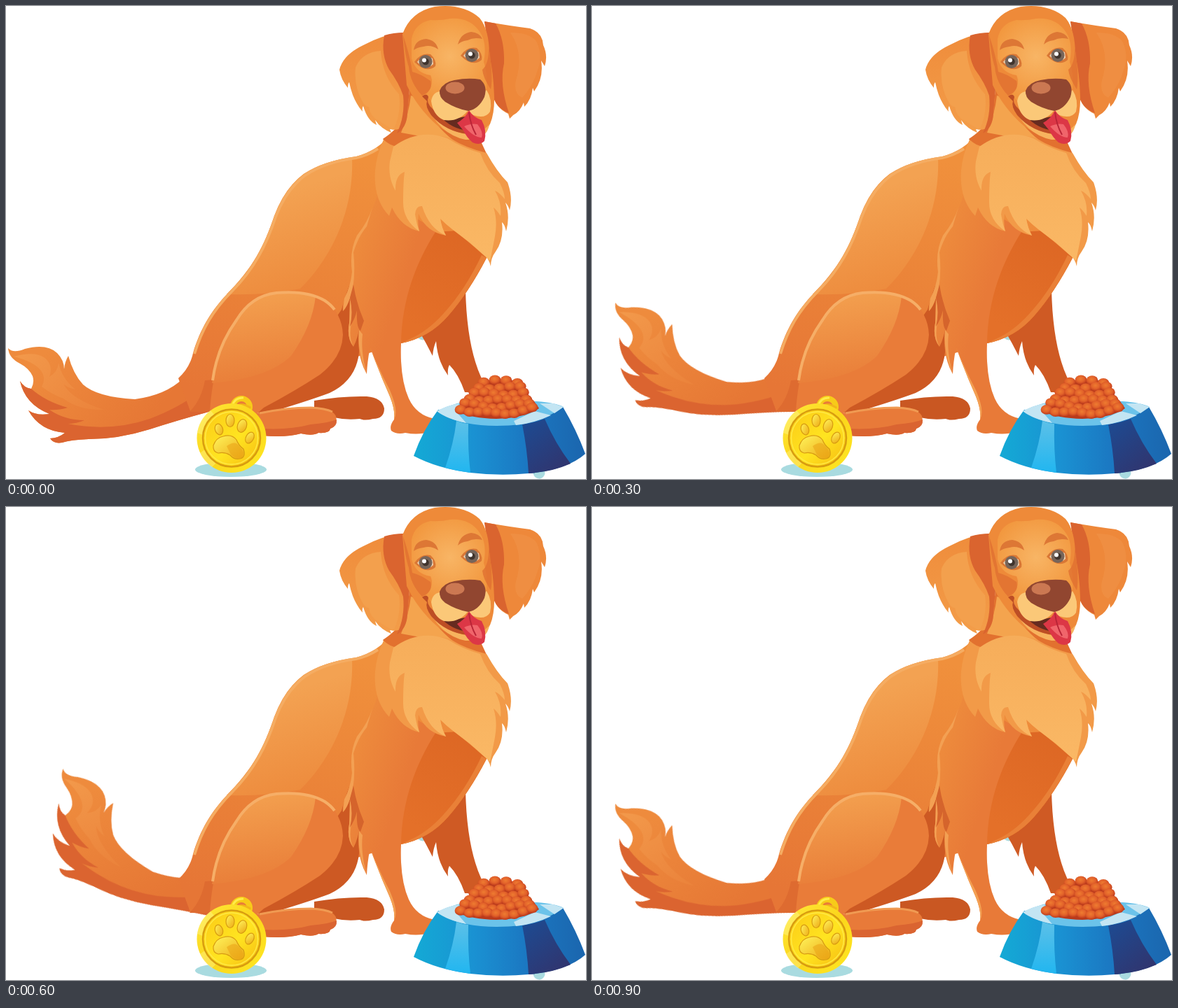
An HTML page for the animation above (1200 ms loop, 828 px wide and 676 px high).

```html
<!DOCTYPE html>
<html lang="en">
<head>
<meta charset="utf-8">
<title>Dog wagging its tail</title>
<style>
  html, body { margin: 0; width: 100%; height: 100%; overflow: hidden; background: #fff; }
  svg { display: block; width: 100vw; height: 100vh; }
  .tail { transform-origin: 293px 585px; animation: wag 1.2s step-end infinite; }
  @keyframes wag {
    0%, 100% { transform: none; }
    25%, 75% { transform: rotate(13.5deg); }
    50% { transform: translate(3.3px, 6.3px) rotate(27deg); }
  }
</style>
</head>
<body>
<svg viewBox="0 0 828 676">
  <defs>
    <linearGradient id="tailFill" gradientUnits="userSpaceOnUse" x1="60" y1="490" x2="200" y2="600">
      <stop stop-color="#ee8b3d"/><stop offset="1" stop-color="#e67735"/>
    </linearGradient>
    <linearGradient id="tuft" gradientUnits="userSpaceOnUse" x1="30" y1="490" x2="150" y2="590">
      <stop stop-color="#f2984a"/><stop offset="1" stop-color="#ea8039"/>
    </linearGradient>
    <linearGradient id="body" gradientUnits="userSpaceOnUse" x1="500" y1="220" x2="400" y2="580">
      <stop stop-color="#f0903c"/><stop offset=".6" stop-color="#ea8138"/><stop offset="1" stop-color="#e67636"/>
    </linearGradient>
    <linearGradient id="back" gradientUnits="userSpaceOnUse" x1="395" y1="265" x2="440" y2="410">
      <stop stop-color="#f3a252"/><stop offset="1" stop-color="#ed8a3c"/>
    </linearGradient>
    <linearGradient id="thigh" gradientUnits="userSpaceOnUse" x1="350" y1="410" x2="370" y2="535">
      <stop stop-color="#f3a04f"/><stop offset="1" stop-color="#e97e39"/>
    </linearGradient>
    <linearGradient id="leg" gradientUnits="userSpaceOnUse" x1="500" y1="300" x2="590" y2="330">
      <stop stop-color="#ee8d3d"/><stop offset="1" stop-color="#e87a38"/>
    </linearGradient>
    <linearGradient id="belly" gradientUnits="userSpaceOnUse" x1="590" y1="460" x2="670" y2="330">
      <stop stop-color="#e47029"/><stop offset="1" stop-color="#dd6724"/>
    </linearGradient>
    <linearGradient id="ruff" x1="0" y1="0" x2="0" y2="1">
      <stop stop-color="#f6ad5a"/><stop offset="1" stop-color="#fab865"/>
    </linearGradient>
    <linearGradient id="ear" x1="0" y1="0" x2="0" y2="1">
      <stop stop-color="#ef8c3b"/><stop offset="1" stop-color="#f39d49"/>
    </linearGradient>
    <radialGradient id="face" gradientUnits="userSpaceOnUse" cx="634" cy="72" r="62">
      <stop stop-color="#f8b565"/><stop offset="1" stop-color="#f2983f"/>
    </radialGradient>
    <linearGradient id="bowl" gradientUnits="userSpaceOnUse" x1="585" y1="0" x2="825" y2="0">
      <stop stop-color="#14a9d5"/><stop offset=".35" stop-color="#1a91d2"/><stop offset=".65" stop-color="#1b78c2"/><stop offset="1" stop-color="#1b66ae"/>
    </linearGradient>
    <linearGradient id="facet" x1="0" y1="0" x2="0" y2="1">
      <stop stop-color="#5cc0e8"/><stop offset="1" stop-color="#21b6f0"/>
    </linearGradient>
    <linearGradient id="shade" x1="0" y1="0" x2=".7" y2="1">
      <stop stop-color="#1c4c94"/><stop offset="1" stop-color="#30356f"/>
    </linearGradient>
    <linearGradient id="gold" x1="0" y1="0" x2="1" y2="1">
      <stop stop-color="#ffea3a"/><stop offset=".5" stop-color="#fbd51b"/><stop offset="1" stop-color="#ffe923"/>
    </linearGradient>
    <linearGradient id="disc" x1="0" y1="0" x2="1" y2="1">
      <stop stop-color="#fbc915"/><stop offset=".55" stop-color="#ffe421"/><stop offset="1" stop-color="#f6b90f"/>
    </linearGradient>
    <linearGradient id="pad" x1="0" y1="0" x2="1" y2="1">
      <stop stop-color="#fff45c"/><stop offset="1" stop-color="#eda813"/>
    </linearGradient>
    <radialGradient id="bit" cx=".45" cy=".4" r=".6">
      <stop stop-color="#ee7c31"/><stop offset=".55" stop-color="#e2622a"/><stop offset="1" stop-color="#bd391c"/>
    </radialGradient>
  </defs>

  <g fill="#a9dbe0">
    <ellipse cx="321" cy="662.5" rx="51" ry="10.5"/>
    <circle cx="761" cy="667" r="8.5"/>
    <circle cx="595" cy="469" r="8.5"/>
  </g>

  <!-- far legs -->
  <path fill="#cf5a24" d="M590 465Q600 482 609 500Q610 488 614 479Q616 508 631 528Q630 518 633 513Q646 526 655 552L690 552Q658 505 656 405L620 430Z"/>
  <path fill="#c95722" d="M440 564Q480 557 515 558Q537 560 540 575Q540 590 524 590Q512 593 505 590Q485 592 468 588L440 590Z"/>

  <g class="tail">
    <path fill="url(#tailFill)" d="M3 489Q10 497 27 490Q58 482 73 496Q83 506 83 519Q84 508 89 500Q96 526 110 541Q130 559 184 562Q228 556 252 533L285 520L293 579Q245 592 205 605Q160 619 118 619Q92 620 80 624Q68 626 63 618Q76 617 84 610Q48 607 32 578Q44 586 62 583Q27 569 20 536Q26 546 36 547Q41 538 38 529Q33 518 20 511Q4 503 3 489Z"/>
    <path fill="#db6430" d="M20 536Q26 546 36 547Q56 565 88 574Q74 578 62 577Q84 592 112 592Q101 597 88 597Q150 609 205 590Q250 573 284 546L293 579Q245 592 205 605Q160 619 118 619Q92 620 80 624Q68 626 63 618Q76 617 84 610Q48 607 32 578Q44 586 62 583Q27 569 20 536Z"/>
    <path fill="url(#tuft)" d="M11 501Q40 493 54 502Q68 512 62 530Q74 523 75 510Q80 533 99 548Q88 546 82 540Q93 562 140 577Q104 578 82 561Q67 556 51 544Q58 531 49 520Q39 508 11 501Z"/>
  </g>

  <!-- torso -->
  <path fill="url(#body)" d="M549 183Q532 206 500 215Q454 221 425 240Q398 260 383 300C369 342 352 375 321 406C292 435 277 463 267 496C264 510 257 522 246 532L263 579L293 580L505 500L564 482Q604 474 631 443Q660 410 686 360L680 215Z"/>
  <path fill="url(#back)" d="M494 217Q454 221 425 240Q398 260 383 300C369 342 352 375 315 412Q370 414 420 404C465 360 497 292 494 217Z"/>
  <path fill="none" stroke="#f5ac62" stroke-width="4" d="M531 204Q517 213 500 217Q455 223 427 242Q400 262 385 301C371 343 354 376 323 407C294 436 279 464 269 497"/>
  <path fill="#de6b30" d="M284 535L298 534L293 580L262 580Q279 563 284 535Z"/>
  <path fill="#cd5923" d="M479 434Q484 415 490 400L510 440L504 495Q500 535 462 553Q430 565 366 584L340 570L440 490Z"/>

  <!-- near hind leg -->
  <path fill="#e97c39" d="M291 580C294 534 304 489 327 449Q348 414 385 410Q430 405 455 420Q480 439 481 470Q480 502 448 527Q413 550 368 574L350 590Z"/>
  <path fill="url(#thigh)" d="M294 539C297 510 309 478 327 449Q348 414 385 410Q418 407 442 414Q438 456 407 500Q375 532 294 539Z"/>
  <path fill="none" stroke="#f6ae67" stroke-width="4" d="M295 535C299 505 311 474 329 449Q350 414 386 410Q430 406 455 421Q464 427 469 434"/>
  <path fill="#e87a39" d="M352 583Q389 574 435 573Q465 574 471 586Q474 599 463 604Q462 611 446 610Q438 615 421 611Q400 617 366 614Z"/>
  <path fill="#da6431" d="M366 604Q405 606 435 598Q460 596 472 591Q473 601 463 604Q462 611 446 610Q438 615 421 611Q400 617 366 614Z"/>
  <path fill="none" stroke="#f09a52" stroke-width="3" d="M362 582Q400 574 435 574Q456 575 466 580"/>

  <!-- foreleg and belly -->
  <path fill="url(#leg)" d="M530 270Q520 305 501 328Q490 350 494 380Q492 401 483 418Q480 426 481 436Q487 430 491 417Q495 440 490 453Q486 474 496 487Q501 478 504 463Q500 500 515 526Q516 505 520 488Q532 522 548 558Q556 578 554 591Q547 600 550 607Q558 613 570 610Q590 614 605 608L612 590Q586 585 575 561Q562 532 564 482L622 325Z"/>
  <path fill="#f3a053" d="M523 288Q517 308 501 328Q490 350 494 380Q492 401 483 418L481 436Q487 430 491 417L495 404Q499 380 496 352Q503 329 515 315ZM491 417Q496 440 493 453Q489 474 496 487Q486 474 490 453ZM504 463Q501 494 515 526Q506 493 509 469ZM520 488Q532 522 548 558Q556 578 554 591Q561 579 548 549Q532 519 520 488Z"/>
  <path fill="#d5642c" d="M496 398L491 417Q496 438 491 458Q498 448 501 435Q500 460 506 464L511 450Q500 425 496 398Z"/>
  <path fill="url(#belly)" d="M613 323C585 367 565 420 564 482Q604 474 631 443Q660 410 686 360L660 320Z"/>
  <path fill="#e98037" d="M564 482Q604 474 631 443Q660 410 686 360L679 356Q656 405 625 439Q601 466 574 477Z"/>

  <!-- neck and ruff -->
  <path fill="#e2712f" d="M576 120L572 150Q565 172 538 190L560 225L670 225L686 211L674 185L640 120Z"/>
  <path fill="#f4a44e" d="M578 128Q575 155 564 181L602 188L640 193Q612 172 590 132Z"/>
  <path fill="#f29a48" d="M539 191Q551 202 561 200Q600 178 634 189Q657 203 686 210Q701 237 716 252Q724 274 719 292Q717 285 713 281Q720 301 714 322Q712 312 708 309Q711 334 699 351Q692 360 692 372Q689 360 683 357Q656 333 637 319L620 304Q622 317 628 328Q600 323 589 297Q587 310 590 322Q564 316 551 288L547 300Q524 276 527 235Q529 212 539 191Z"/>
  <path fill="url(#ruff)" d="M553 201Q590 174 630 189Q652 203 677 210Q686 236 705 253Q712 267 712 276Q704 266 698 264Q708 281 706 300Q701 292 696 288Q702 307 698 329Q694 350 691 364Q680 354 662 338L637 319Q628 312 620 304Q622 317 628 328Q604 318 594 286Q585 285 584 298Q586 311 590 322Q567 306 567 281Q567 252 569 237Q555 242 556 264Q545 245 548 222Z"/>

  <!-- ears -->
  <path fill="url(#ear)" d="M568 38Q540 40 510 56Q481 70 476 91Q478 105 488 117Q488 110 490 109Q495 135 509 151Q508 145 510 143Q516 164 529 170L527 163Q535 175 550 181L548 176Q569 181 573 155L578 90Z"/>
  <path fill="#f3a04d" d="M535 64Q508 66 499 88Q496 113 509 137Q514 145 518 144Q520 158 532 164Q543 171 553 177Q565 153 561 126Q537 100 535 64Z"/>
  <path fill="#da642f" d="M540 42Q553 38 568 38L579 92Q576 116 573 154Q572 174 558 182Q570 157 567 128Q561 110 547 91Q535 70 540 42Z"/>
  <path fill="#ee883a" d="M683 22Q717 28 748 32Q766 38 767 56Q774 71 769 86L764 78Q768 103 754 122L752 117Q750 134 740 144L739 138Q734 151 724 156L719 161L717 154Q698 145 695 126L690 70Z"/>
  <path fill="#da642f" d="M683 22L699 25Q712 48 711 82Q704 112 718 153Q698 145 695 126L691 70Z"/>
  <path fill="#f1964a" d="M720 38Q749 38 758 52Q767 73 758 94Q753 113 737 131Q724 125 728 106Q740 67 720 38Z" opacity=".5"/>

  <!-- head -->
  <path fill="#ee8a39" d="M566 40Q578 8 612 1Q652-4 676 17Q690 34 690 70Q696 95 697 130Q698 174 674 189Q644 193 615 170Q587 145 572 113Z"/>
  <path fill="url(#face)" d="M579 47Q583 25 606 20Q621 21 634 18Q663 16 677 38Q687 53 682 80Q688 96 686 118L660 151L620 145Q605 137 600 126Q612 112 606 99Q585 96 579 75Z"/>
  <path fill="#df6e30" d="M567 42Q570 72 575 87Q577 110 594 128Q610 121 606 107Q592 97 580 94Q577 72 567 42Z" opacity=".75"/>
  <path fill="#df6e30" d="M689 58Q690 82 680 91Q681 102 692 119Q696 100 689 58Z" opacity=".75"/>
  <path fill="#dd7735" d="M582 63Q584 48 600 47Q614 49 617 62Q607 55 596 58Q587 59 582 63ZM645 55Q649 39 664 37Q676 38 680 47Q668 44 659 49Q650 50 645 55Z"/>

  <path fill="#f7b35e" d="M599 139Q615 173 651 182Q675 187 690 169Q687 192 656 191Q619 184 599 139Z"/>
  <path fill="#bd4e25" d="M594 129Q601 124 603 130Q599 138 609 147Q625 165 654 172L660 183Q628 180 607 156Q598 143 601 136Z"/>
  <path fill="#662b20" d="M619 157Q638 163 655 158L660 178Q636 176 619 157Z"/>
  <path fill="#fbc878" d="M607 136Q609 123 620 122L660 146L686 120Q695 134 691 151Q684 162 667 156L659 150Q646 166 625 163Q610 157 607 136Z"/>
  <path fill="#dc3746" d="M644 167Q655 161 661 149Q667 159 679 163Q687 178 683 193Q676 200 666 195Q657 187 653 178Z"/>
  <path fill="#f0656b" d="M654 172Q664 167 673 169Q682 180 679 188Q668 188 654 172Z"/>
  <path fill="none" stroke="#b92537" stroke-width="2" d="M661 152Q663 170 671 184"/>
  <path fill="#914630" d="M619 121Q624 109 640 106Q660 102 677 105Q688 114 683 130Q675 147 660 150Q643 147 627 137Q618 130 619 121Z"/>
  <ellipse cx="641" cy="117" rx="13.5" ry="8.5" fill="#cb7852"/>

  <g id="eye">
    <path fill="#d97735" d="M583 80Q592 66 606 69Q615 77 613 86Q600 97 583 80Z"/>
    <path fill="#f0d3b3" d="M587 80Q596 68 609 75L610 83Q599 93 587 80Z"/>
    <circle cx="599" cy="79.500" r="9.500" fill="#76655a"/>
    <circle cx="599" cy="79.500" r="4.800" fill="#40342d"/>
    <circle cx="597" cy="77.500" r="3" fill="#fff"/>
  </g>
  <use href="#eye" x="66" y="-9"/>

  <!-- bowl -->
  <path fill="url(#bowl)" d="M617 577L795 573Q814 605 827 640Q801 663 746 668Q705 672 663 667Q616 661 582 643Q595 606 617 577Z"/>
  <path fill="url(#facet)" d="M643 593Q651 596 660 597Q659 633 663 667Q645 665 627 660Q639 626 643 593Z"/>
  <path fill="url(#shade)" d="M737 598Q753 596 769 590Q784 625 806 654Q779 666 746 668Q744 633 737 598Z"/>
  <path fill="#6bc3ea" d="M615 579Q643 565 670 564L758 565Q784 567 796 573Q771 591 736 598Q691 603 657 596Q629 590 615 579Z"/>
  <path fill="#c3e5f3" d="M615 579Q629 571 647 568L642 579L657 596Q629 590 615 579ZM725 593L755 579L778 585Q755 596 728 599ZM762 568L781 568L796 573L783 582Z"/>
  <path fill="#b93b1c" d="M644 580Q666 547 685 535L724 535Q747 554 761 575Q740 589 700 590Q665 589 644 580Z"/>
  <g id="food" fill="url(#bit)"></g>

  <!-- medal -->
  <circle cx="336" cy="573" r="12" fill="none" stroke="#f7cb19" stroke-width="8"/>
  <path fill="none" stroke="#ffec49" stroke-width="3" d="M323 571Q327 559 339 560"/>
  <path fill="#f2b51a" d="M327 572Q336 564 350 573L347 579L326 577Z"/>
  <circle cx="322" cy="617.500" r="49.500" fill="url(#gold)"/>
  <path fill="#fff49a" d="M273 610Q276 589 292 578L299 586Q284 598 281 613ZM277 639L285 633Q290 646 300 653L294 659Q282 651 277 639Z" opacity=".4"/>
  <circle cx="322" cy="617.500" r="41" fill="url(#disc)" stroke="#d89c10" stroke-width="2.500"/>
  <circle cx="322" cy="617.500" r="37.500" fill="none" stroke="#ffe945" stroke-width="1.500"/>
  <g fill="url(#pad)" stroke="#d79b12" stroke-width="1.200">
    <ellipse cx="304" cy="605" rx="5.500" ry="8" transform="rotate(-18 304 605)"/>
    <ellipse cx="320" cy="592.500" rx="6" ry="9"/>
    <ellipse cx="337" cy="600" rx="6.500" ry="9.500" transform="rotate(18 337 600)"/>
    <ellipse cx="348" cy="617" rx="5.500" ry="8.500" transform="rotate(28 348 617)"/>
    <path d="M296 628Q300 617 310 615Q322 611 329 620Q332 628 339 633Q343 645 334 647Q326 649 320 642Q312 637 303 639Q295 637 296 628Z"/>
  </g>
  <path fill="#eaa216" d="M315 629Q327 620 333 629Q342 638 337 645Q329 649 321 641Z" opacity=".55"/>
</svg>
<script>
  // Pile the kibble in widening rows, back to front
  const food = document.getElementById('food');
  const rows = 6;
  for (let row = 0; row < rows; row++) {
    const count = 4 + row;
    const half = 24 + row * 5.4;
    const midX = 706 - row * 1.2;
    const midY = 536 + row * 9.2;
    for (let i = 0; i < count; i++) {
      const u = 2 * i / (count - 1) - 1;
      const bit = document.createElementNS(food.namespaceURI, 'ellipse');
      bit.setAttribute('cx', midX + u * half);
      bit.setAttribute('cy', midY - u * u * (row - 1) * 1.6 + Math.sin(i * 5 + row * 3) * 2);
      bit.setAttribute('rx', 8.4);
      bit.setAttribute('ry', 6.8);
      food.append(bit);
    }
  }
</script>
</body>
</html>
```
